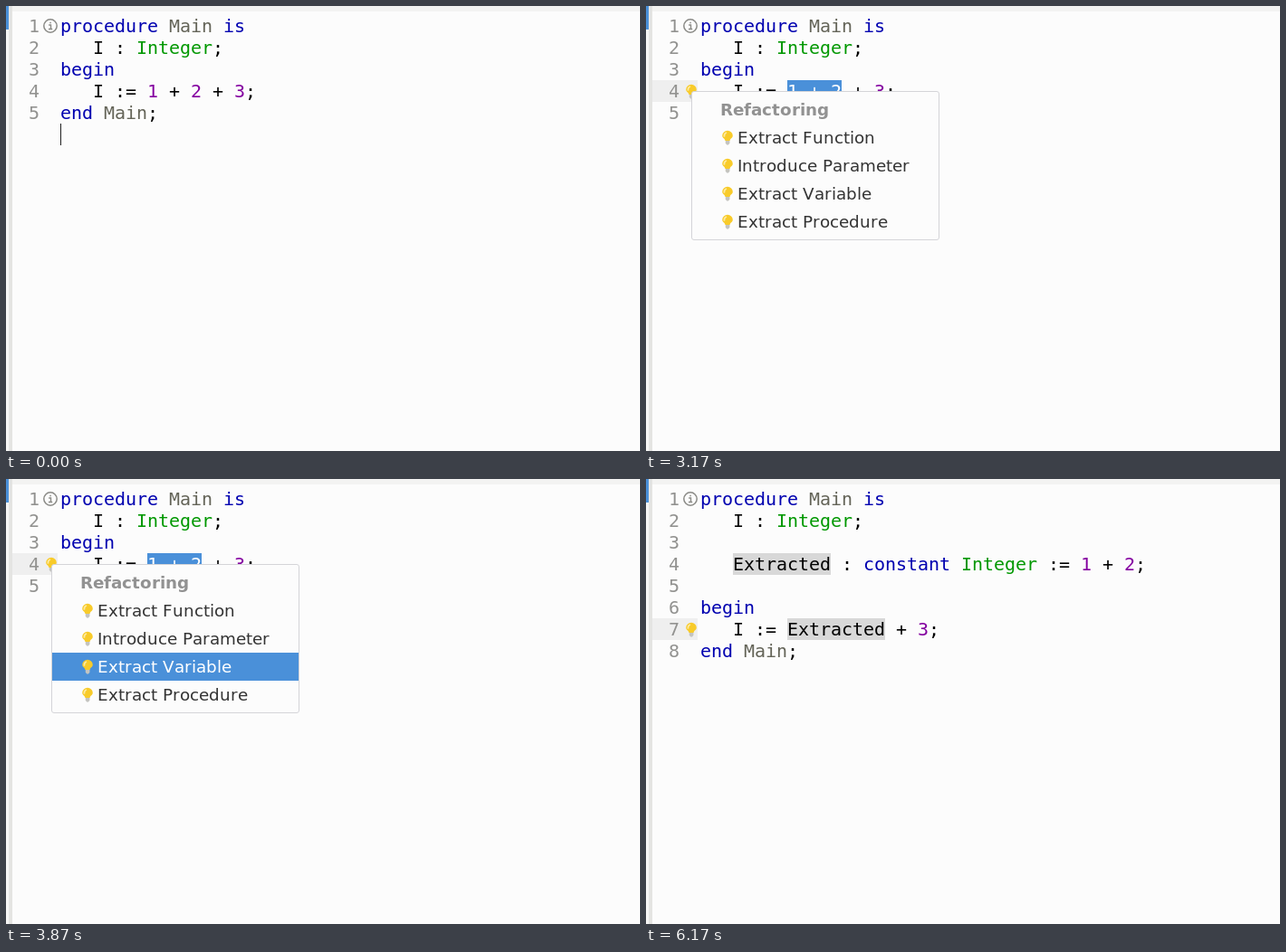
Recreate the animation shown at these times as an HTML page. Size 700 by 492 pixels, loop 6300 ms.

```html
<!DOCTYPE html>
<html lang="en">
<head>
<meta charset="utf-8">
<title>Extract variable</title>
<style>
html, body { margin: 0; width: 100%; height: 100%; overflow: hidden; background: #fcfcfc; }
#stage { position: relative; width: 700px; height: 492px; overflow: hidden; background: #fcfcfc; }
#stage div, #stage .token, #stage svg { position: absolute; }
#stage div { box-sizing: border-box; }

.top { left: 0; top: 0; width: 700px; height: 6px; background: #f3f3f2; }
.side { left: 0; top: 0; width: 3px; height: 492px; background: #f6f6f5; }
.edge { left: 3px; top: 0; width: 4px; height: 492px; background: #e4e4e2; }
.tab { left: 0; top: 0; width: 3px; height: 26px; background: #4a90d9; }

.code, .sel { font: 20px/24px "DejaVu Sans Mono", monospace; white-space: pre; color: #000; }
.code { left: 0; top: 0; }
.num { color: #929290; }
.kw { color: #0000b0; }
.name { color: #646458; }
.type { color: #009800; }
.lit { color: #8400a0; }

.row { left: 7px; width: 50px; height: 24px; background: #efefef; }
.mark { width: 108px; height: 24px; background: #d8d8d8; }
.caret { width: 1px; height: 24px; background: #202020; }
.sel { left: 156px; top: 82px; width: 0; height: 24px; overflow: hidden; background: #4a90d9; }
.sel .label { color: #fff; }

.menu { left: 50px; top: 94px; width: 274px; height: 165px; background: #fcfcfc;
  border: 1px solid #d4d4d8; border-radius: 3px;
  font: 18.33px/31px "DejaVu Sans", sans-serif; font-kerning: none; white-space: pre; color: #343434; }
.menu b { position: absolute; left: 31px; top: 4px; color: #929292; }
.item { left: 0; width: 272px; height: 31px; padding-left: 50px; }
.item svg { left: 32px; top: 7px; }

/* Every change is a hard cut on one 6300 ms clock. */
.anim { animation: 6300ms step-end infinite; }
.old { animation-name: old; }
.new { animation-name: new; }
.home { animation-name: home; }
.click { animation-name: click; }
.active { animation-name: active; }
.hint { animation-name: hint; }
.sel { animation-name: sel; }
.menu { animation-name: menu; }
.fn { animation-name: fn; }
.param { animation-name: param; }
.var { animation-name: var; }
.mark { animation-name: mark; }
.blink { animation-name: blink; }
@keyframes old { 0% { visibility: visible } 73.01%, 100% { visibility: hidden } }
@keyframes new { 0% { visibility: hidden } 73.01%, 100% { visibility: visible } }
@keyframes home { 0% { opacity: 1 } 17.46%, 100% { opacity: 0 } }
@keyframes click { 0% { opacity: 0 } 17.46% { opacity: 1 } 21.11%, 100% { opacity: 0 } }
@keyframes active { 0% { opacity: 0 } 17.46%, 100% { opacity: 1 } }
@keyframes hint { 0% { opacity: 0 } 29.68%, 100% { opacity: 1 } }
@keyframes sel {
  0% { width: 0 } 21.11% { width: 12px } 21.74% { width: 24px } 22.69% { width: 36px }
  23.33% { width: 48px } 25.87% { width: 60px } 73.01%, 100% { width: 0 }
}
@keyframes menu { 0% { opacity: 0 } 50.31% { opacity: 1 } 72.53%, 100% { opacity: 0 } }
@keyframes fn { 55.55% { background: #4a90d9; color: #fff } 57.14% { background: none; color: #343434 } }
@keyframes param { 57.14% { background: #4a90d9; color: #fff } 60.79% { background: none; color: #343434 } }
@keyframes var { 60.79% { background: #4a90d9; color: #fff } 72.53% { background: none; color: #343434 } }
@keyframes mark { 0% { opacity: 0 } 76.19%, 100% { opacity: 1 } }
@keyframes blink { 0% { opacity: 1 } 78.88% { opacity: 0 } 85.23% { opacity: 1 } 97.93%, 100% { opacity: 0 } }
</style>
</head>
<body>
<svg width="0" height="0" style="position:absolute">
  <symbol id="bulb" viewBox="0 0 14 17">
    <path d="M4.8 10.5h4.6v4.3L8 16.5H6.2L4.8 14.8z" fill="#c4c4c0"/>
    <path d="M7 .7a5.8 5.8 0 0 1 5.8 5.8C12.8 9 9.7 9.6 9.5 12H4.5C4.3 9.6 1.2 9 1.2 6.5A5.8 5.8 0 0 1 7 .7z" fill="#f8cb2a"/>
    <path d="M3.6 7.6A3.6 3.6 0 0 1 6 3" fill="none" stroke="#fdeaa0" stroke-width="1.8"/>
  </symbol>
</svg>
<div id="stage">
  <div class="top"></div>
  <div class="side"></div>
  <div class="edge"></div>
  <div class="tab"></div>

  <div class="anim old">
    <div class="row anim active" style="top:82px"></div>
    <svg class="anim hint" style="left:43px;top:86px" width="14" height="17"><use href="#bulb"/></svg>
    <div class="code" id="before"></div>
    <div class="caret anim home" style="left:60px;top:130px"></div>
    <div class="caret anim click" style="left:156px;top:82px"></div>
    <div class="sel anim"><span class="label">1 + 2</span></div>
  </div>

  <div class="anim new">
    <div class="row" style="top:154px"></div>
    <svg style="left:43px;top:158px" width="14" height="17"><use href="#bulb"/></svg>
    <div class="mark anim" style="left:96px;top:82px"></div>
    <div class="mark anim" style="left:156px;top:154px"></div>
    <div class="code" id="after"></div>
    <div class="caret anim blink" style="left:264px;top:154px"></div>
  </div>

  <svg style="left:40px;top:13px" width="18" height="18" fill="none" stroke="#8a8a86">
    <circle cx="9" cy="9" r="7.2" stroke-width="1.5"/>
    <path d="M7.2 8H9.5V12.5M7 12.5H11.2M8.3 5.5H9.8" stroke-width="1.4"/>
  </svg>

  <div class="menu anim">
    <b class="label">Refactoring</b>
    <div class="item anim fn" style="top:35px"><span class="label">Extract Function</span></div>
    <div class="item anim param" style="top:66px"><span class="label">Introduce Parameter</span></div>
    <div class="item anim var" style="top:97px"><span class="label">Extract Variable</span></div>
    <div class="item" style="top:128px"><span class="label">Extract Procedure</span></div>
  </div>
</div>
<script>
const CELL = 12, LINE = 24, LEFT = 60, TOP = 10;
const kinds = [
  [/^(procedure|is|begin|end|constant)$/, 'kw'],
  [/^Main$/, 'name'],
  [/^Integer$/, 'type'],
  [/^\d+$/, 'lit'],
];
const pen = document.createElement('canvas').getContext('2d');

// Round each glyph's advance to whole pixels, as hinted desktop text does.
function snap(el) {
  const { fontWeight, fontSize, fontFamily } = getComputedStyle(el);
  pen.font = `${fontWeight} ${fontSize} ${fontFamily}`;
  const glyphs = [...el.textContent].map(char => {
    const span = document.createElement('span');
    const width = pen.measureText(char).width;
    span.textContent = char;
    span.style.letterSpacing = Math.round(width) - width + 'px';
    return span;
  });
  el.replaceChildren(...glyphs);
}

function put(box, text, x, row, kind) {
  const el = document.createElement('span');
  el.textContent = text;
  el.className = 'token label ' + kind;
  el.style.left = x + 'px';
  el.style.top = TOP + row * LINE + 'px';
  box.append(el);
}

// Tokens sit on a fixed character grid.
function layout(id, source) {
  const box = document.getElementById(id);
  source.split('\n').forEach((line, row) => {
    put(box, row + 1, LEFT - 35, row, 'num');
    for (const { 0: word, index } of line.matchAll(/\w+|[^\w\s]+/g)) {
      const kind = kinds.find(([re]) => re.test(word));
      put(box, word, LEFT + index * CELL, row, kind ? kind[1] : '');
    }
  });
}

layout('before', `procedure Main is
   I : Integer;
begin
   I := 1 + 2 + 3;
end Main;`);

layout('after', `procedure Main is
   I : Integer;

   Extracted : constant Integer := 1 + 2;

begin
   I := Extracted + 3;
end Main;`);

document.querySelectorAll('.label').forEach(snap);

for (const item of document.querySelectorAll('.item'))
  item.insertAdjacentHTML('afterbegin', '<svg width="14" height="17"><use href="#bulb"/></svg>');
</script>
</body>
</html>
```
